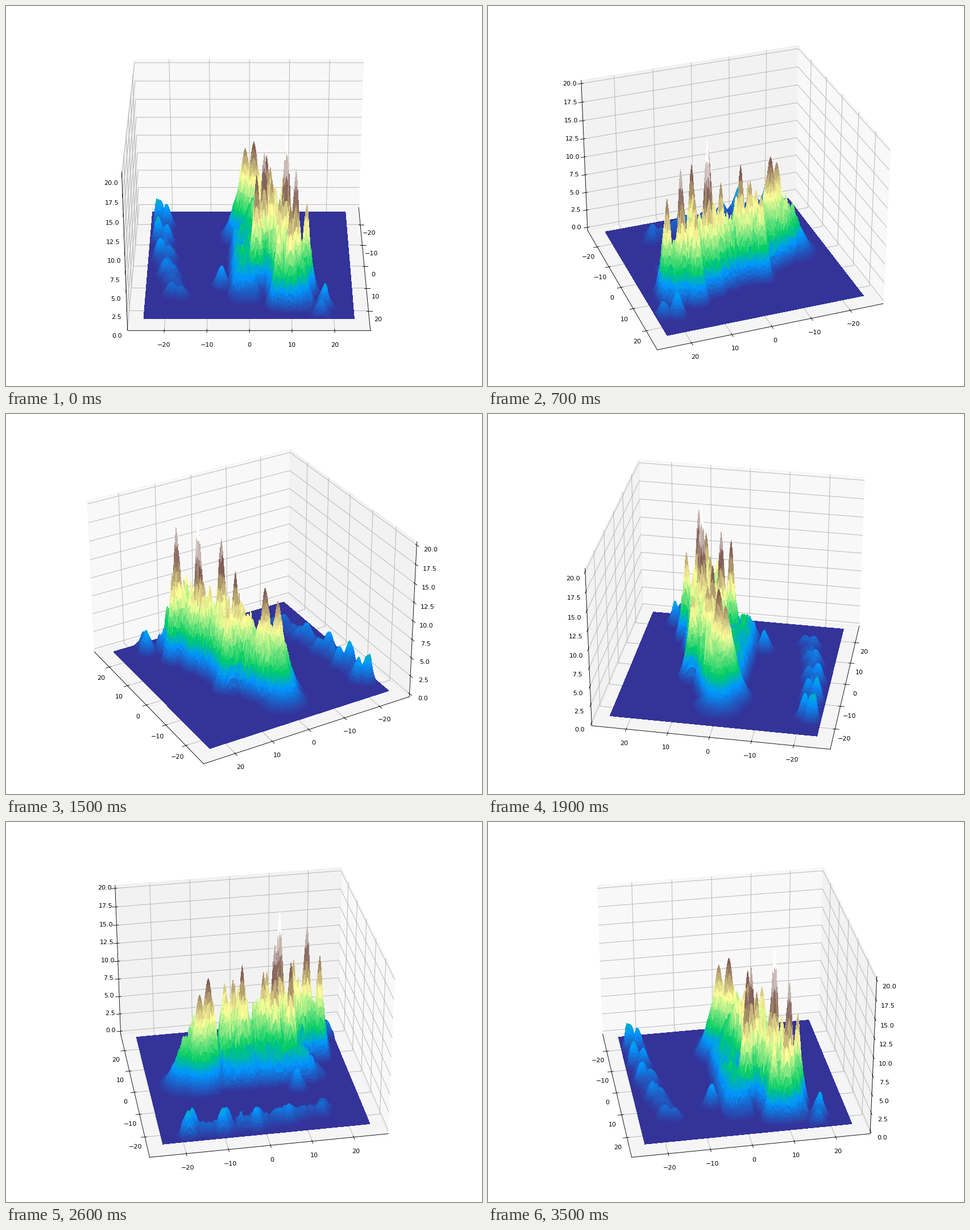
These frames come from a looping animation (837x669 px, 3.6 s). A matplotlib script:

```python
import matplotlib.pyplot as plt
import numpy as np
from matplotlib.animation import FuncAnimation
from mpl_toolkits.mplot3d.art3d import Poly3DCollection

W, H, DPI, PAD = 837, 669, 80, 12.5
FRAMES, INTERVAL = 36, 100
LOW, HIGH, N = -25, 24.75, 165

# x, y, height of the main summits
SUMMITS = [
    (9.1, 8.8, 20), (16.4, 10.8, 17.3), (6.9, 3.4, 17), (10.6, 1.7, 15),
    (-1, 4.2, 14.5), (-9.9, 1, 14), (19.4, 9.5, 13.4), (4.3, 5.3, 13),
    (-12.3, -1, 12.5), (13.5, 13.4, 12.1), (-4.6, 8.3, 11.1), (-16.2, 0, 6.8),
]
KNOLLS = [(10.9, -6.9, 2.8), (20, 17.8, 2.9), (23, 17, 2.1)]

rng = np.random.default_rng(7)
axis = np.linspace(LOW, HIGH, N)
X, Y = np.meshgrid(axis, axis, indexing="ij")


def falloff(e):
    """Exponential decay that reaches zero at a finite distance."""
    return np.clip(1.08 * np.exp(-e) - .08, 0, None)


def noise(block, passes):
    a = rng.normal(size=(N // block, N // block))
    a = np.kron(a, np.ones((block, block)))
    for _ in range(passes):
        a = (2 * a + sum(np.roll(a, s, d) for s in (-1, 1) for d in (0, 1))) / 6
    return np.clip(a / a.std(), -2, 2)


def peak(x, y, h, r, power):
    """Peak centred on the nearest grid node, so its tip keeps full height."""
    x, y = (axis[np.abs(axis - v).argmin()] for v in (x, y))
    return h * falloff((np.hypot(X - x, Y - y) / r) ** power)


def ridge_y(x):
    return 5.2 + .27 * x


def coast_y(x):
    return 4.4 * ((x + 18.5) / 32.5) ** 2 - 23


def terrain():
    fine, blocks = noise(1, 1), noise(3, 1)

    # mountain body, apron of foothills, shelf along the coast
    width = np.interp(X, (-18, -4), (2.6, 4.5))
    body = 7.3 * falloff(np.abs((Y - ridge_y(X)) / width) ** 3 + ((X - 1.5) / 19) ** 8)
    apron = 3.4 * falloff(((Y + 1) / 3.6) ** 4 + ((X - 2) / 15) ** 6)
    shelf = 1.3 * falloff(((Y - coast_y(X) - 1) / 2.2) ** 2 + ((X + 3) / 17) ** 8)
    z = np.maximum.reduce([body, apron, shelf]) * (1 + .17 * fine + .17 * blocks)

    # main summits, then seeded crags scattered along the ridge
    crags = [(x, ridge_y(x) + rng.uniform(-4, 4), rng.uniform(8.5, 12.5))
             for x in np.linspace(-5, 19, 14)]
    rough = 1 - .1 * np.abs(fine) - .05 * np.abs(blocks)
    for x, y, h in SUMMITS + crags:
        near = np.clip(np.hypot(X - x, Y - y) - .3, 0, 1)
        r = np.interp(x, (-10, -3), (3.4, 1.75))
        z = np.maximum(z, peak(x, y, h, r, 1.4) * (1 - near + near * rough))

    # coastal hills get lower and move inland, each with a smaller partner
    coast = [(x + s, coast_y(x) + 2 * s, (1 - .2 * s) * np.interp(x, (-18, 14), (3.7, 1.8)))
             for x in np.linspace(-18.5, 14, 5) for s in (0, 1)]
    for x, y, h in coast + KNOLLS:
        z = np.maximum(z, peak(x, y, h, 1.7, 1.9) * (1 + .08 * blocks))

    for x, depth in ((-7.3, .7), (1.5, .4)):
        z *= 1 - depth * np.exp(-((X - x) / .55) ** 2)
    z *= np.clip((25 - np.abs(Y)) / 1.2, 0, 1)
    return np.where(z < .06, 0, z)


grid = np.stack([X, Y, terrain()], axis=-1)
quads = np.stack([grid[:-1, :-1], grid[1:, :-1], grid[1:, 1:], grid[:-1, 1:]], axis=2)
quads = quads.reshape(-1, 4, 3)
quads = quads[quads[:, :, 2].max(axis=1) > 0]
tones = plt.get_cmap("terrain")(quads[:, :, 2].mean(axis=1) / 18)

fig = plt.figure(figsize=(W / DPI, H / DPI), dpi=DPI)
ax = fig.add_axes([PAD / W, PAD / H, 1 - 2 * PAD / W, 1 - 2 * PAD / H],
                  projection="3d", computed_zorder=False)

floor = [[(LOW, LOW, 0), (HIGH, LOW, 0), (HIGH, HIGH, 0), (LOW, HIGH, 0)]]
for faces, color, order in ((floor, [(.2, .2, .6)], 1), (quads, tones, 2)):
    ax.add_collection3d(Poly3DCollection(
        faces, facecolors=color, linewidths=0, antialiased=False, zorder=order))

mid, half = (LOW + HIGH) / 2, (HIGH - LOW) / 2 * 1.1 * 25 / 24
ax.set(xlim=(mid - half, mid + half), ylim=(mid - half, mid + half),
       zlim=(-5 / 12, 20 + 5 / 12))
ax.tick_params(pad=4.2)


def draw(i):
    ax.view_init(elev=30, azim=360 * i / FRAMES)
    return []


anim = FuncAnimation(fig, draw, frames=FRAMES, interval=INTERVAL, repeat=True)
plt.show()
```
